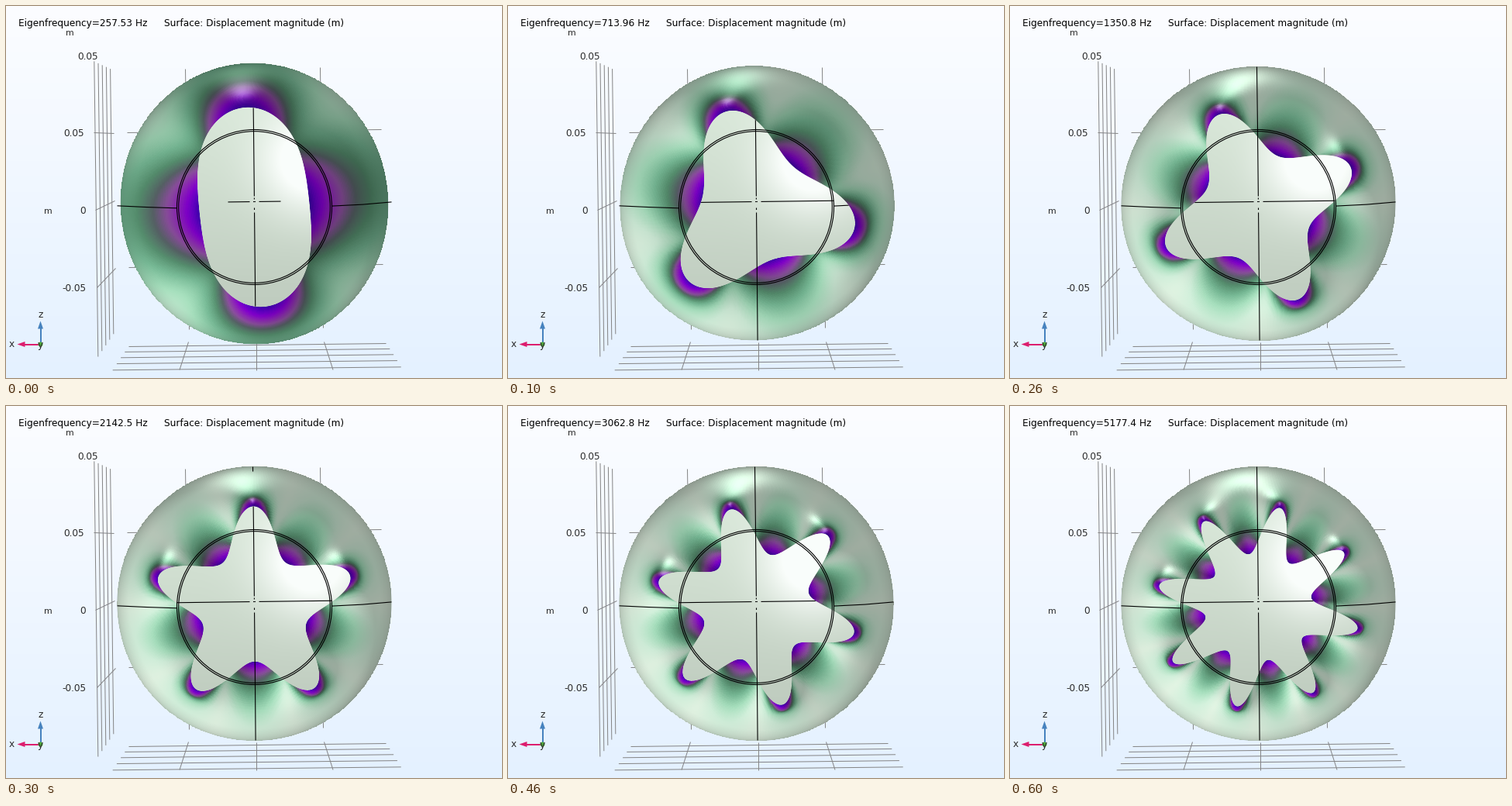
Recreate the animation shown at these times as a matplotlib script. Size 640x480 px, loop 0.7 s.

```python
import numpy as np
import matplotlib.pyplot as plt
from matplotlib.animation import ArtistAnimation
from matplotlib.colors import LinearSegmentedColormap
from matplotlib.patches import Circle, Polygon

W, H, DPI = 640, 480, 100
PX = 72 / DPI
RIM, BOWL = 100, 177
CX, RIM_Y, BOWL_Y = 320, 259, 254.5

FREQS = "257.53 713.96 1350.8 2142.5 3062.8 4084.9 5177.4".split()
PHASES = [96, 108, 113.5, 90.5, 105, 83, 77.7]

AURORA = LinearSegmentedColormap.from_list("aurora", [
    "#dcecdc", "#cbe8d4", "#a2d9b8", "#74b592", "#548c6c", "#545f63",
    "#864c98", "#8824b0", "#7e00c6", "#5e00be", "#3a00a8"])

fig = plt.figure(figsize=(W / DPI, H / DPI), dpi=DPI)
ax = fig.add_axes([0, 0, 1, 1])
ax.axis("off")


def setup_view():
    # whole numbers fall on pixel centres
    ax.set_xlim(-0.5, W - 0.5)
    ax.set_ylim(H - 0.5, -0.5)
    ax.autoscale(False)


def picture(rgb, z):
    return ax.imshow(rgb, extent=(-0.5, W - 0.5, H - 0.5, -0.5),
                     aspect="auto", interpolation="nearest", zorder=z)


def line(pts, color="black", width=1.1, z=6, clip=None):
    art, = ax.plot(*zip(*pts), color=color, lw=width * PX, zorder=z,
                   solid_capstyle="butt")
    if clip is not None:
        art.set_clip_path(clip)
    return art


def label(x, y, s, size=12.1, color="#2a2a2a"):
    return ax.text(x, y, s, fontsize=size * PX, color=color,
                   family="DejaVu Sans", va="baseline", zorder=8)


def shape(pts, color, z):
    return ax.add_patch(Polygon(pts, fc=color, ec="none", zorder=z))


def unit(v):
    return np.array(v) / np.linalg.norm(v)


def deformed_bowl(n, phase):
    """Vertices of the bowl around its axis and their displacement."""
    psi = np.linspace(np.arcsin(RIM / BOWL), np.pi / 2, 110)[:, None]
    t = np.linspace(0, 2 * np.pi, 721)[None, :]
    rho = BOWL * np.sin(psi)
    depth = rho - RIM
    decay = np.exp(-(depth / (20 + 72 / n)) ** 2)
    fade = np.exp(-depth / (24 + 340 / n ** 3))

    # inextensional ring: the hoop motion follows from the radial one
    amp = 29 + 0.3 * (n - 2)
    wave = n * (t - np.radians(phase))
    radial = amp * decay * np.cos(wave)
    around = -amp / n * decay * np.sin(wave)
    r = rho + radial
    px = r * np.cos(t) - around * np.sin(t)
    py = r * np.sin(t) + around * np.cos(t)
    pz = BOWL * np.cos(psi) + 0.8 * radial
    size = fade * np.hypot(np.cos(wave), 0.85 / n * np.sin(wave))
    centre = RIM_Y + (BOWL_Y - RIM_Y) * depth / (BOWL - RIM)
    return px, py, pz, centre, size, np.cos(psi)


def shade(px, py, pz, size, facing):
    p = np.stack([px, py, pz], axis=-1)
    normal = np.cross(np.gradient(p, axis=0), np.gradient(p, axis=1))
    normal /= np.linalg.norm(normal, axis=-1, keepdims=True) + 1e-9
    diffuse = np.clip(normal @ unit([-0.5, -0.55, 0.67]), 0, 1)
    gloss = np.clip(normal @ unit([-0.1, 0.9, 0.43]), 0, 1) ** 38
    light = (0.73 + 0.31 * diffuse) * (0.87 + 0.13 * np.clip(facing / 0.4, 0, 1))
    rgb = AURORA(np.clip(size, 0, 1))[..., :3] * light[..., None]
    rgb += 0.4 * gloss[..., None] * np.array([0.85, 1, 0.9])
    rgb = np.clip(rgb, 0, 1)
    return (rgb[:-1, :-1] + rgb[1:, :-1] + rgb[:-1, 1:] + rgb[1:, 1:]) / 4


def inside_picture():
    y, x = np.mgrid[:H, :W]
    glow = np.exp(-((x - 394) ** 2 + (y - 198) ** 2) / (2 * 46 ** 2))
    glow = np.clip(1.45 * glow, 0, 1)[..., None]
    base = np.array([207, 221, 207]) / 255
    base = base * np.clip(1.04 - 0.0005 * (y - 150), 0, 1.1)[..., None]
    return np.clip(base + (np.array([0.98, 0.995, 0.985]) - base) * glow, 0, 1)


def axis_lines(n, phase, opening):
    """Axis arms on the bowl; an outward lobe covers the arm behind it."""
    arms = {
        0: [(497, 252.4), (460, 255.6), (420, 257.6)],
        90: [(318, 78), (319, 159)],
        180: [(143, 257.3), (180, 259), (220, 260.3)],
        270: [(321.6, 431), (321, 359)],
    }
    out = []
    for angle, pts in arms.items():
        covered = np.cos(n * np.radians(angle - phase)) > 0.3
        out.append(line(pts, clip=opening if covered else None))
        if covered and n > 4:
            (x0, y0), (x1, y1) = pts[:2]
            f = 6 / np.hypot(x1 - x0, y1 - y0)
            out.append(line([(x0, y0), (x0 + f * (x1 - x0), y0 + f * (y1 - y0))]))

    reach = 34 if n == 2 else 100
    for a, b in [(-reach, -6), (6, reach), (-1.5, 1.5)]:
        out.append(line([(CX + a, 252 - a / 80), (CX + b, 252 - b / 80)],
                        clip=opening))
    for a, b in [(159, 245), (247, 249), (260, 262.5), (266, 359)]:
        out.append(line([(319 + (a - 159) / 100, a), (319 + (b - 159) / 100, b)]))
    return out


def mode_artists(n, freq, phase, inside):
    px, py, pz, centre, size, facing = deformed_bowl(n, phase)
    sx, sy = CX + px, centre - py
    edge = shape(np.c_[sx[-1], sy[-1]], "#a2b2a4", 2)
    opening = shape(np.c_[sx[0], sy[0]], "#cedccd", 4)
    bowl = ax.pcolormesh(sx, sy, shade(px, py, pz, size, facing),
                         shading="flat", zorder=3)
    view = picture(inside, 5)
    view.set_clip_path(opening)
    title = label(15, 25.5, f"Eigenfrequency={freq} Hz", color="black")
    return [edge, opening, bowl, view, title, *axis_lines(n, phase, opening)]


def draw_grid():
    def rule(x0, y0, x1, y1):
        line([(x0, y0), (x1, y1)], "#858585", 1, 1)

    for i in range(5):
        rule(113.3 + 5.2 * i, 71 + 2.4 * i, 118.3 + 5 * i, 452 - 7.3 * i)
        y = 439 + 6.7 * i + 0.22 * i * i
        rule(158 - 5.2 * i, y, 490 + 4.8 * i, y - 4)
    for k in (-1, 0, 1):
        rule(115 + 2 * k, 263 + 100 * k, 140 + k, 251 + 87 * k)
        rule(322.5 + 87.5 * k, 433, 322.5 + 99 * k, 469)
        if k:
            rule(318 + 87 * k, 80 - k, 322.5 + 86.5 * k, 416 - k)
            rule(157 + k, 250 + 87 * k, 485 + k, 246 + 87 * k)

    label(92, 68.5, "0.05")
    for x, y, s in [(74, 168, "0.05"), (95, 268, "0"), (72, 368, "-0.05")]:
        label(x, y - 0.5, s)
    label(77, 38, "m", 11)
    label(48.5, 268, "m", 11)


def draw_triad():
    x, y = 44, 436
    pink, blue, green = "#dc1e6e", "#4682be", "#50aa3c"
    line([(x, y), (x - 22, y)], pink, 2)
    line([(x, y), (x, y - 22)], blue, 2)
    shape([(x - 30, y), (x - 20, y - 3.5), (x - 20, y + 3.5)], pink, 7)
    shape([(x, y - 30), (x - 3.5, y - 20), (x + 3.5, y - 20)], blue, 7)
    ax.add_patch(Circle((x, y), 3, fc=green, ec="none", zorder=7))
    label(3, y + 4, "x")
    label(x - 3.5, y - 35, "z")
    label(x - 3.5, y + 4, "y")


def draw_scene():
    top, bottom = np.array([252, 253, 255]), np.array([228, 241, 255])
    f = np.linspace(0, 1, H)[:, None, None]
    picture(np.repeat((top + (bottom - top) * f) / 255, 2, axis=1), 0)
    draw_grid()
    draw_triad()
    for r in (RIM, RIM - 2.2):
        ax.add_patch(Circle((CX, RIM_Y), r, fc="none", ec="black",
                            lw=1.1 * PX, zorder=7))
    label(204, 25.5, "Surface: Displacement magnitude (m)", color="black")


setup_view()
draw_scene()
inside = inside_picture()
frames = [mode_artists(n, freq, phase, inside)
          for n, (freq, phase) in enumerate(zip(FREQS, PHASES), start=2)]
setup_view()

anim = ArtistAnimation(fig, frames, interval=100, repeat=True, repeat_delay=0)
plt.show()
```
